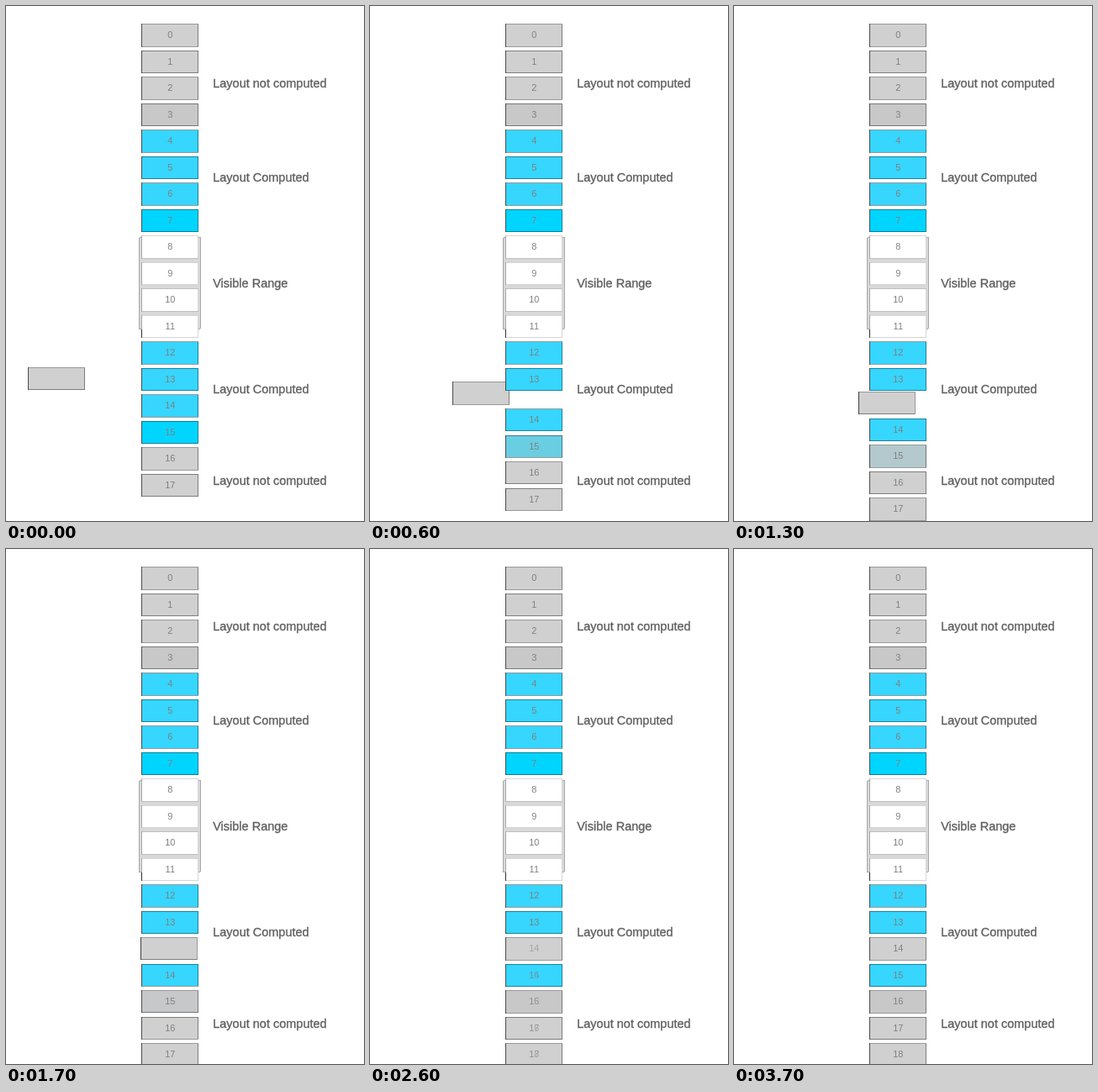
Recreate the animation shown at these times as an HTML page. Size 426 px wide and 613 px high, loop 4100 ms.

```html
<!DOCTYPE html>
<html lang="en">
<head>
<meta charset="utf-8">
<style>
html, body { margin: 0; width: 100%; height: 100%; overflow: hidden; background: #fff; }
svg { display: block; }
rect, path { shape-rendering: crispEdges; }
text { font-family: "Liberation Sans", Arial, sans-serif; }
.num { font-size: 11px; fill: #808080; text-anchor: middle; }
.label { font-size: 14.5px; fill: #606060; stroke: #606060; stroke-width: .35px; }
</style>
</head>
<body>
<svg id="stage" width="426" height="613" viewBox="0 0 426 613"></svg>
<script>
const LOOP = 4100, STEP = 100, MOVE = 1900, FADE_AT = 2000;
const X = 161.4, TOP = 21.4, PITCH = 31.5, W = 67, H = 26.3;
const GREY = '#d0d0d0', DARK_GREY = '#c8c8c8', BLUE = '#36d6ff', DEEP_BLUE = '#00d5ff';
const stage = document.getElementById('stage');

function add(parent, tag, attrs, text) {
  const el = document.createElementNS('http://www.w3.org/2000/svg', tag);
  for (const key in attrs) el.setAttribute(key, attrs[key]);
  if (text !== undefined) el.textContent = text;
  parent.append(el);
  return el;
}

const slotY = i => TOP + PITCH * i;
const easeOut = u => 1 - (1 - Math.min(1, Math.max(0, u))) ** 2;
const mix = (a, b, p) => a + (b - a) * p;
const place = (group, x, y) => group.setAttribute('transform', `translate(${x} ${y})`);
const addNumber = (group, n) => add(group, 'text', { class: 'num', x: 33.9, y: 17 }, n);

function addCell(fill, edge = '#000') {
  const group = add(stage, 'g', {});
  const box = add(group, 'rect', {
    x: .5, y: .5, width: W, height: H, fill, stroke: edge, 'stroke-opacity': .4
  });
  add(group, 'path', { d: `M.5 0v${H + 1}`, stroke: edge, 'stroke-opacity': .5 });
  return { group, box };
}

function cellFill(i) {
  if (i === 3) return DARK_GREY;
  if (i < 3 || i > 15) return GREY;
  if (i > 7 && i < 12) return '#fff';
  return i === 7 || i === 15 ? DEEP_BLUE : BLUE;
}

add(stage, 'rect', { x: 158.5, y: 275.5, width: 73, height: 109, rx: 1.5, fill: '#d8d8d8', stroke: '#a8a8a8' });

const inserted = addCell(GREY);
inserted.next = addNumber(inserted.group, 14);

const cells = Array.from({ length: 18 }, (_, i) => {
  const visible = i > 7 && i < 12;
  const cell = addCell(cellFill(i), visible ? '#999' : '#000');
  cell.old = addNumber(cell.group, i);
  if (i > 13) cell.next = addNumber(cell.group, i + 1);
  if (i === 11) add(cell.group, 'path', { d: 'M.5 17v10', stroke: '#333' });
  place(cell.group, X, slotY(i));
  return cell;
});

[['Layout not computed', 97], ['Layout Computed', 209], ['Visible Range', 335],
 ['Layout Computed', 461], ['Layout not computed', 570]]
  .forEach(([text, y]) => add(stage, 'text', { class: 'label', x: 246.2, y }, text));

function draw(now) {
  const t = Math.floor(now % LOOP / STEP) * STEP;
  const move = easeOut(t / MOVE);
  const fade = easeOut((t - FADE_AT) / MOVE);

  place(inserted.group, mix(26, X, move), mix(430, slotY(14), move));
  inserted.next.style.opacity = fade;

  for (let i = 14; i < 18; i++) {
    const { group, old, next } = cells[i];
    place(group, X, slotY(i + move));
    old.style.opacity = 1 - fade;
    next.style.opacity = fade;
  }
  const [r, g, b] = [[0, 200], [213, 200], [255, 200]].map(([from, to]) => Math.round(mix(from, to, move)));
  cells[15].box.setAttribute('fill', `rgb(${r},${g},${b})`);
}

const start = performance.now();
function tick() {
  draw(performance.now() - start);
  requestAnimationFrame(tick);
}
tick();
</script>
</body>
</html>
```
